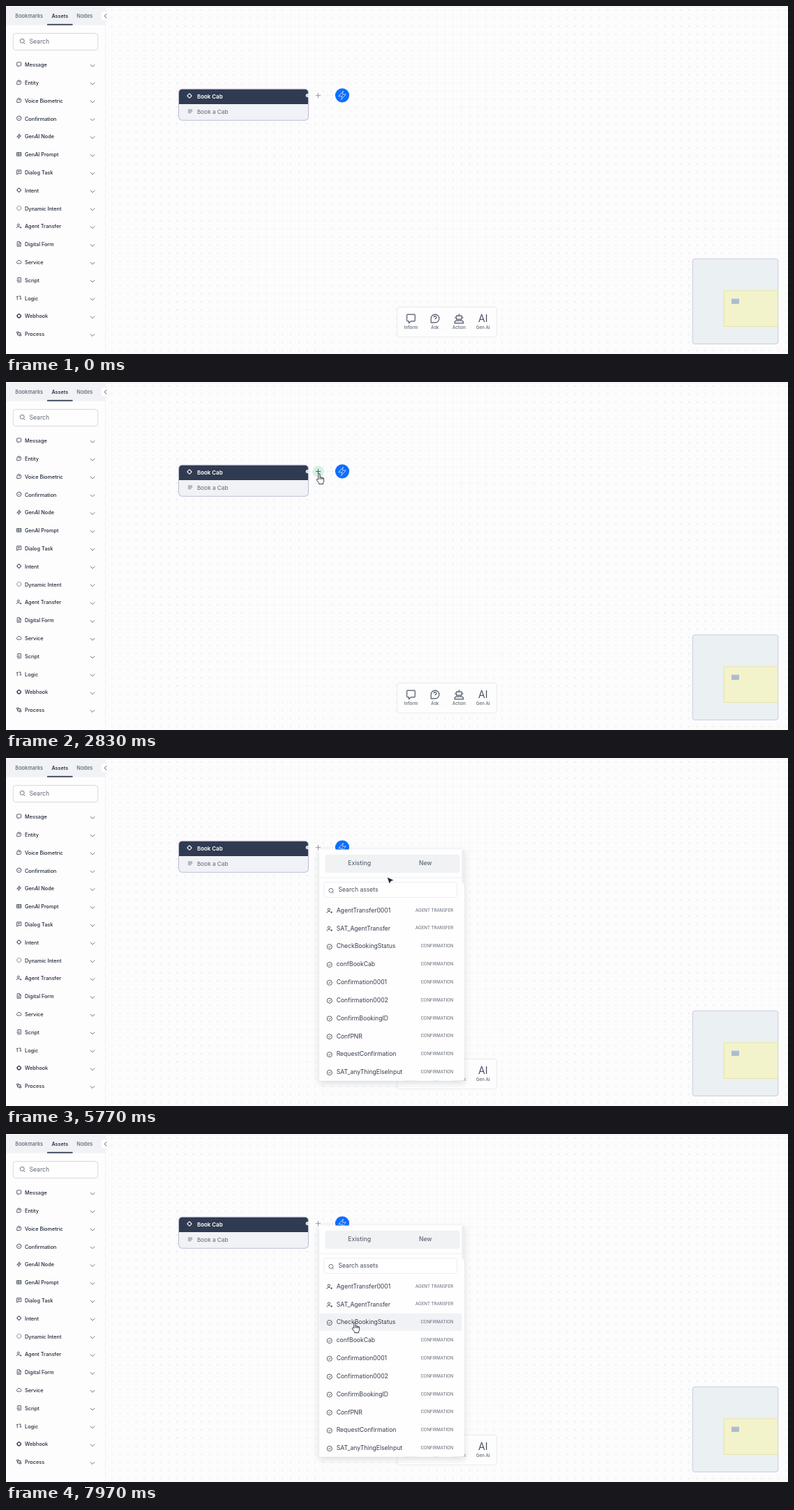
An HTML page for the animation above (8000 ms loop, 1121 px wide and 500 px high).

```html
<!DOCTYPE html>
<html lang="en">
<head>
<meta charset="utf-8">
<title>Dialog builder</title>
<style>
html, body { margin: 0; width: 100%; height: 100%; overflow: hidden; background: #fcfcfc; }
svg { display: block; width: 100%; height: 100%; }
text { font-family: Inter, Arial, sans-serif; white-space: pre; }
</style>
</head>
<body>
<svg id="stage" viewBox="0 0 1121 500" xmlns="http://www.w3.org/2000/svg"></svg>
<script>
const LOOP = 8000;
const INK = '#2b3446', GREY = '#5d6574';

const ICONS = {
  message: 'M-2.4-3H2.4Q3-3 3-2.4V1.4Q3 2 2.4 2H0L-1.5 3.4V2H-2.4Q-3 2-3 1.4V-2.4Q-3-3-2.4-3Z',
  ask: 'M-2.9 3V0A3 3 0 1 1 .1 3ZM-.9-.8A.95.95 0 1 1 .1.2V.5M.1 1.4V1.6',
  check: 'M-3.2 0A3.2 3.2 0 1 1 3.2 0A3.2 3.2 0 1 1-3.2 0M-1.3 0L-.3 1L1.5-1',
  bolt: 'M.8-3.4L-2.9.7H-.1L-.8 3.4L2.9-.7H.1Z',
  prompt: 'M-3.2-2.4H3.2V2.4H-3.2ZM-3.2 0H3.2M-.7-2.4V2.4M1.2-1.2H2M1.2 1.2H2',
  dialog: 'M-3-3H3V2.1H-1.6L-3 3.3ZM-1.5-1.3H1.5M-1.5.3H.6',
  target: 'M-2.5 0A2.5 2.5 0 1 1 2.5 0A2.5 2.5 0 1 1-2.5 0M0-3.6V-1.6M0 3.6V1.6M-3.6 0H-1.6M3.6 0H1.6',
  dynamic: 'M-3 0A3 3 0 1 1 3 0A3 3 0 1 1-3 0',
  agent: 'M-2.3-1.6A1.5 1.5 0 1 1 .7-1.6A1.5 1.5 0 1 1-2.3-1.6M-3.4 3V2.2Q-3.2.8-.8.8Q.6.8 1 1.6M1.3 2H3.7M2.5.8V3.2',
  form: 'M-2.5-3.3H1L2.5-1.7V3.3H-2.5ZM1-3.3V-1.7H2.5M-1.2-.2H1.2M-1.2 1.4H1.2',
  cloud: 'M-1.8 2.2A1.6 1.6 0 0 1-2.2-.9A2.4 2.4 0 0 1 2.3-.8A1.55 1.55 0 0 1 2 2.2Z',
  script: 'M-1.8-1V-3.1H2.7V3.1H-1.8V1.7M-3.4.4H.7M-.6-.9L.7.4L-.6 1.7',
  logic: 'M-2.4 3V-2.5M-3.5-1.4L-2.4-2.6L-1.3-1.4M-.3-2.5H2.3V2M1.2.9L2.3 2L3.4.9',
  process: 'M-3-2.8H-.6V-.8H-3ZM.6.8H3V2.8H.6ZM-.6-1.8H2.3V.8M-2 -.8V1.8H.6',
  bot: 'M-2-2H2V.6H-2ZM0-2V-3.4M-2.8-1.2V-.2M2.8-1.2V-.2M-.9-.8V-.5M.9-.8V-.5M-3.2 3.4V2.7Q-3 1.6-1.6 1.6H1.6Q3 1.6 3.2 2.7V3.4Z',
  lines: 'M-3.2-2H3.2M-3.2 0H3.2M-3.2 2H1.6'
};

const ASSETS = [
  ['Message', 'message'], ['Entity', 'ask'], ['Voice Biometric', 'ask'], ['Confirmation', 'check'],
  ['GenAI Node', 'bolt'], ['GenAI Prompt', 'prompt'], ['Dialog Task', 'dialog'], ['Intent', 'target'],
  ['Dynamic Intent', 'dynamic'], ['Agent Transfer', 'agent'], ['Digital Form', 'form'], ['Service', 'cloud'],
  ['Script', 'script'], ['Logic', 'logic'], ['Webhook', 'target'], ['Process', 'process']
];

const ROWS = ['AgentTransfer0001', 'SAT_AgentTransfer', 'CheckBookingStatus', 'confBookCab', 'Confirmation0001',
  'Confirmation0002', 'ConfirmBookingID', 'ConfPNR', 'RequestConfirmation', 'SAT_anyThingElseInput'];
const ROW_TOP = 205.6, ROW_H = 25.83;

// Pointer tip: [ms, x, y]
const PATH = [
  [1600, 505, 11], [1860, 530, 95], [2090, 494, 182], [2330, 449, 132], [4400, 449, 132],
  [4730, 476.5, 147], [5030, 499, 147], [5530, 499, 147], [5800, 552, 172], [6130, 606, 148],
  [6630, 606, 148], [6770, 588, 153.5], [7030, 560, 182], [7400, 532, 214], [7670, 532, 214],
  [7970, 500, 271], [8000, 500, 271]
];

const rect = (x, y, w, h, fill, more = '') =>
  `<rect x="${x}" y="${y}" width="${w}" height="${h}" fill="${fill}" ${more}/>`;
const circle = (x, y, r, fill, more = '') => `<circle cx="${x}" cy="${y}" r="${r}" fill="${fill}" ${more}/>`;
const line = (d, color, width = 0.8, more = '') =>
  `<path d="${d}" fill="none" stroke="${color}" stroke-width="${width}" ${more}/>`;
const label = (s, x, y, size, color = INK, weight = 400, anchor = 'start') =>
  `<text x="${x}" y="${y + size * 0.36}" font-size="${size}" fill="${color}" font-weight="${weight}" text-anchor="${anchor}">${s}</text>`;
const icon = (name, x, y, scale = 1, color = INK, width = 0.8) =>
  `<g transform="translate(${x} ${y}) scale(${scale})">` +
  line(ICONS[name], color, width / scale, 'stroke-linejoin="round"' + (name === 'dynamic' ? ' stroke-dasharray="1.5 .8"' : '')) + '</g>';
const lens = (x, y) => circle(x, y, 3, 'none', `stroke="${GREY}" stroke-width=".9"`) +
  line(`M${x + 2.2} ${y + 2.2}l1.9 1.9`, GREY, 0.9);

function canvas() {
  return `<defs><pattern id="dots" width="11.65" height="11.65" patternUnits="userSpaceOnUse" x="146" y="0">
    <circle cx="5.8" cy="5.8" r="1.1" fill="#ebebf0"/></pattern>
    <filter id="shadow" x="-20%" y="-20%" width="140%" height="140%">
    <feDropShadow dx="0" dy="3" stdDeviation="4" flood-color="#30384a" flood-opacity=".17"/></filter>
    <clipPath id="card"><rect x="247.5" y="119.2" width="186" height="45" rx="5"/></clipPath></defs>` +
    rect(0, 0, 1121, 500, '#fcfcfc') + rect(143, 2, 978, 498, 'url(#dots)') + rect(0, 0.8, 1121, 1, '#efeff1');
}

function sidebar() {
  let s = rect(0, 2, 142, 498, '#fdfdfd') + rect(0, 2, 142, 25.4, '#f0f2f5') +
    line('M142.5 2V500', '#e6e6ef', 0.8, 'stroke-dasharray="2 1"') +
    label('Bookmarks', 13.3, 14.8, 7.4, GREY, 500) + label('Assets', 65.4, 14.8, 7.2, INK, 600) +
    label('Nodes', 101.3, 14.8, 7.4, GREY, 500) + rect(59, 25.8, 36.5, 1.8, '#333e52') +
    circle(142.5, 14.3, 7, '#fff', 'stroke="#ededf1" stroke-width=".7"') + line('M144.2 11.4L141.2 14.4L144.2 17.4', INK, 0.9) +
    rect(10.3, 39.4, 121.4, 24, '#fefefe', 'rx="4" stroke="#d3d3de" stroke-width=".9"') +
    lens(23.2, 50.2) + label('Search', 33.5, 51.2, 8.6, GREY);
  ASSETS.forEach(([name, glyph], i) => {
    const y = 84.5 + i * 25.81;
    s += icon(glyph, 18.6, y - 0.6, 1, INK, name === 'Webhook' ? 1.2 : 0.8) + label(name, 27, y, 7.3, '#1f2838', 500) +
      line(`M120.8 ${y - 0.4}l3.2 3.2l3.2-3.2`, GREY, 0.9);
  });
  return s;
}

function node() {
  return '<g clip-path="url(#card)">' + rect(247, 119, 187, 46, '#f1f2f5') + rect(247, 119, 187, 22, '#303b51') + '</g>' +
    rect(247.5, 119.2, 186, 45, 'none', 'rx="5" stroke="#bfbfdc" stroke-width="1.1"') +
    icon('target', 263, 129, 1.05, '#fff', 1) + label('Book Cab', 274, 129.7, 7.9, '#fff', 600) +
    icon('lines', 264, 151.2, 1, GREY) + label('Book a Cab', 274, 151.7, 8.2, GREY) +
    line('M435 128.6H472', '#e2e2ea', 0.8, 'stroke-dasharray="2 2"') +
    circle(432.3, 128.6, 2.4, '#d9dde5', 'stroke="#fff" stroke-width=".6"') +
    circle(447.5, 128.6, 8, '#fcfcfc', 'id="plusBg"') +
    line('M444 128.6H451M447.5 125.1V132.1', '#8b919c', 0.9, 'id="plus"') +
    circle(482, 128.3, 10.1, '#0f6efc') + icon('bolt', 482, 128.3, 1.8, '#b9d7ff', 0.9);
}

function toolbar() {
  let s = rect(561, 432.3, 142.4, 43.4, '#fdfdfd', 'rx="3.5" stroke="#e7e7ed" stroke-width=".9"');
  [['Inform', 'message'], ['Ask', 'ask'], ['Action', 'bot'], ['Gen AI', '']].forEach(([name, glyph], i) => {
    const x = 580.5 + i * 34.45;
    s += (glyph ? icon(glyph, x, 449, 1.95, '#4a5263', 1.15) : label('AI', x, 448.8, 14.2, '#4a5263', 400, 'middle')) +
      label(name, x, 462.2, 6.2, GREY, 500, 'middle');
  });
  return s;
}

function minimap() {
  return rect(984.2, 363.2, 122.6, 122.4, '#ebf0f3', 'rx="3.5" stroke="#c6c6e8" stroke-width=".9"') +
    rect(1029, 409, 77.3, 51.3, '#f2f3cb', 'stroke="#e9e19b" stroke-width=".9"') + rect(1040, 420.6, 11, 7.5, '#aebbd2');
}

function popup() {
  let s = rect(449, 131.5, 208, 332.3, '#fefefe', 'rx="2.5" filter="url(#shadow)"') +
    rect(449.5, 0, 203.8, ROW_H - 0.8, '#f1f2f5', 'id="hover"') +
    rect(457.5, 138.7, 193, 26.3, '#f1f2f4', 'rx="3"') +
    label('Existing', 506.7, 151.3, 8.7, GREY, 500, 'middle') + label('New', 601.2, 151.3, 8.6, GREY, 500, 'middle') +
    line('M449.5 172H654', '#ececf1', 0.9) + rect(653.6, 132, 3.2, 48, '#ededf0', 'rx="1.5"') +
    rect(456, 178.4, 190.5, 22, '#fff', 'rx="3" stroke="#eaeaf0" stroke-width=".9"') +
    lens(465.9, 190.3) + label('Search assets', 476.5, 189.3, 8.6, '#444c5b');
  ROWS.forEach((name, i) => {
    const y = 218.6 + i * ROW_H, agent = i < 2;
    s += icon(agent ? 'agent' : 'check', 463.8, y + 0.9, 1.12, '#3a4252', 0.85) + label(name, 473.7, y, 8.6, '#333b4b') +
      label(agent ? 'AGENT TRANSFER' : 'CONFIRMATION', 641.3, y - 0.2, 6.1, GREY, 400, 'end');
  });
  return `<g id="popup">${s}</g>`;
}

function pointer() {
  return `<g id="cursor"><path id="arrow" d="M0 0L10 4.3L5.6 6L3.6 10.2Z" fill="#1c2233" stroke="#fff" stroke-width=".7" stroke-linejoin="round"/>
    <path id="hand" d="M-1.2 8.2V.9Q-1.2-.3 0-.3Q1.1-.3 1.1.9V4.8Q2.3 4 3.1 5.1Q4.3 4.6 4.9 5.7Q6.6 5.4 6.6 7.1V9.8Q6.6 11.6 5.6 12.8V14.6H-.3V13.2L-3.6 8.9Q-4 7.8-3 7.4Q-2.2 7.2-1.2 8.2ZM1.1 4.8V8M3.1 5.1V8M4.9 5.7V8.2"
      fill="#fff" stroke="#222a38" stroke-width=".9" stroke-linejoin="round"/></g>`;
}

document.getElementById('stage').innerHTML =
  canvas() + sidebar() + node() + toolbar() + minimap() + popup() + pointer();

const el = {};
for (const id of ['plusBg', 'plus', 'popup', 'hover', 'cursor', 'arrow', 'hand']) el[id] = document.getElementById(id);
const show = (e, on) => e.setAttribute('visibility', on ? 'inherit' : 'hidden');

const same = (a, b) => a[1] === b[1] && a[2] === b[2];

// Velocity at a path point; zero wherever the pointer rests
function slope(i, k) {
  const a = PATH[i - 1], p = PATH[i], b = PATH[i + 1];
  return !a || !b || same(a, p) || same(p, b) ? 0 : (b[k] - a[k]) / (b[0] - a[0]);
}

function tip(t) {
  let i = 0;
  while (i < PATH.length - 2 && t >= PATH[i + 1][0]) i++;
  const a = PATH[i], b = PATH[i + 1], d = b[0] - a[0];
  const u = Math.min(1, Math.max(0, (t - a[0]) / d)), v = 1 - u;
  return [1, 2].map(k => v * v * (1 + 2 * u) * a[k] + u * u * (3 - 2 * u) * b[k] +
    d * u * v * (v * slope(i, k) - u * slope(i + 1, k)));
}

function render(t) {
  const [x, y] = tip(t), live = t >= 1600, open = t >= 3700;
  const onPlus = live && Math.hypot(x - 447.5, y - 128.6) < 10;
  const inside = open && x > 449 && x < 654;
  const row = Math.floor((y - ROW_TOP) / ROW_H);
  const onRow = inside && row >= 0;
  const hand = onPlus || onRow || (inside && y > 138 && y < 166);

  el.plusBg.setAttribute('fill', onPlus ? '#d6efe2' : '#fcfcfc');
  el.plus.setAttribute('stroke', onPlus ? '#17623f' : '#8b919c');

  show(el.popup, open);
  const grow = Math.min(1, Math.max(0, (t - 3700) / 70));
  const scale = 0.852 + 0.148 * (1 - (1 - grow) ** 2);
  el.popup.setAttribute('transform', `translate(553 297.7) scale(${scale}) translate(-553 -297.7)`);
  show(el.hover, onRow);
  el.hover.setAttribute('y', ROW_TOP + 0.4 + Math.max(0, row) * ROW_H);

  show(el.cursor, live);
  show(el.hand, hand);
  show(el.arrow, !hand);
  el.cursor.setAttribute('transform', `translate(${x} ${y})`);
}

const start = performance.now();
function tick() {
  render((performance.now() - start) % LOOP);
  requestAnimationFrame(tick);
}
tick();
</script>
</body>
</html>
```
